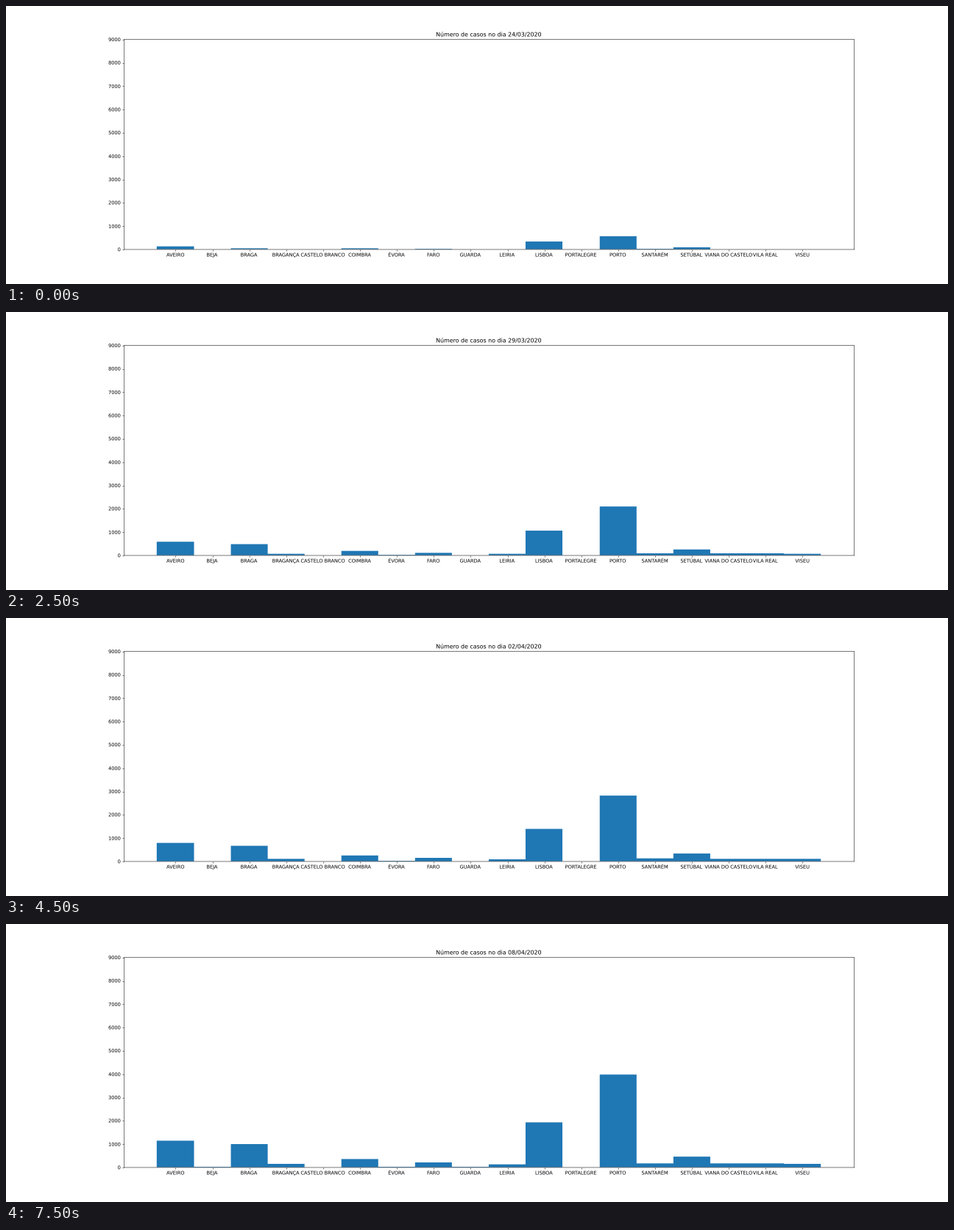
Write a matplotlib script that moves like this. It is 1280 by 379 pixels and loops after 8 s.

```python
import numpy as np
import matplotlib.pyplot as plt
from matplotlib.animation import FuncAnimation
from matplotlib.patches import PathPatch
from matplotlib.textpath import TextPath
from matplotlib.transforms import Affine2D, ScaledTranslation

WIDTH, HEIGHT = 1280, 379
DPI = WIDTH / 27
FRAMES, INTERVAL = 16, 500
Y_MAX = 9000

# Layout units: a canvas of 1944 x 576 points that fills the figure
CANVAS_W, CANVAS_H = 1944, 576
LEFT, BOTTOM = 0.125 * CANVAS_W, 0.125 * CANVAS_H
PLOT_W, PLOT_H = 0.775 * CANVAS_W, 0.755 * CANVAS_H

# First and last total of each district; all follow the same growth curve
CASES = {
    "AVEIRO": (120, 1135), "BEJA": (0, 10.5), "BRAGA": (45, 995),
    "BRAGANÇA": (0, 145), "CASTELO BRANCO": (0, 0), "COIMBRA": (45, 350),
    "ÉVORA": (5, 22), "FARO": (20, 207), "GUARDA": (0, 10.5),
    "LEIRIA": (0, 125), "LISBOA": (330, 1920), "PORTALEGRE": (0, 0),
    "PORTO": (555, 3970), "SANTARÉM": (20, 165), "SETÚBAL": (85, 455),
    "VIANA DO CASTELO": (0, 165), "VILA REAL": (5, 165), "VISEU": (5, 148),
}
FIRST, LAST = np.array(list(CASES.values())).T
COUNT = len(CASES)
X_MIN, X_SPAN = -1.4, COUNT + 1.8

plt.rcParams.update({
    "font.family": "DejaVu Sans",
    "axes.linewidth": 0.8,
    "xtick.major.width": 0.8,
    "ytick.major.width": 0.8,
})


def grid(values, step):
    """Round values to whole multiples of step."""
    return np.floor(values / step + 0.5) * step


def growth(day):
    return np.interp(day, [0, 2, 5, 7, 9, 11, 15],
                     [0, .14, .45, .49, .66, .79, 1])


def heights(day):
    return grid(FIRST + (LAST - FIRST) * growth(day), Y_MAX / PLOT_H)


def heading(day):
    number, month = 24 + day, 3
    if number > 31:
        number, month = number - 31, 4
    return f"Número de casos no dia {number:02d}/{month:02d}/2020"


def text_path(x, baseline, text, size=10, align=0.5):
    """Outline of text; align is 0.5 for centred and 1 for right-aligned."""
    path = TextPath((0, 0), text, size=size)
    box = path.get_extents()
    shift = x - box.x0 - align * box.width
    return path.transformed(Affine2D().translate(shift, baseline))


def title_path(day):
    return text_path(LEFT + PLOT_W / 2, 513, heading(day), size=12)


# The small surplus guards against losing a pixel to float truncation
fig = plt.figure(figsize=((WIDTH + .01) / DPI, (HEIGHT + .01) / DPI),
                 dpi=DPI, facecolor="white")
canvas = Affine2D().scale(1 / CANVAS_W, 1 / CANVAS_H) + fig.transFigure


def write(path):
    return fig.add_artist(PathPatch(path, facecolor="black", linewidth=0,
                                    transform=canvas, snap=False))


# Axis lines are centred half a point inside their cell
ax = fig.add_axes([(LEFT + 0.5) / CANVAS_W, (BOTTOM - 0.5) / CANVAS_H,
                   1507 / CANVAS_W, 435 / CANVAS_H])
ax.set_xlim(X_MIN, X_MIN + X_SPAN)
ax.set_ylim(0, Y_MAX)
ax.set_xticks(range(COUNT))
ax.set_yticks(range(0, Y_MAX + 1, 1000))
ax.tick_params(labelbottom=False, labelleft=False)
for spine in ax.spines.values():
    spine.set_snap(False)

for i, name in enumerate(CASES):
    write(text_path(LEFT + (i - X_MIN) / X_SPAN * PLOT_W, BOTTOM - 15, name))
for value in range(0, Y_MAX + 1, 1000):
    y = BOTTOM + value / Y_MAX * PLOT_H
    write(text_path(LEFT - 7, grid(y - 4, 1), str(value), align=1))
title = write(title_path(0))

edges = np.arange(COUNT + 1) - 0.5
edges = grid(edges - X_MIN, X_SPAN / PLOT_W) + X_MIN
bars = ax.stairs(heights(0), edges, fill=True, color="#1f77b4")
bars.set_snap(False)
# Bars stand on the upper edge of the axis line
nudge = ScaledTranslation(-0.5 / 72, 0.5 / 72, fig.dpi_scale_trans)
bars.set_transform(ax.transData + nudge)


def update(day):
    bars.set_data(values=heights(day))
    title.set_path(title_path(day))
    return bars, title


anim = FuncAnimation(fig, update, frames=FRAMES, interval=INTERVAL,
                     init_func=lambda: update(0), repeat=True, repeat_delay=0)
plt.show()
```
